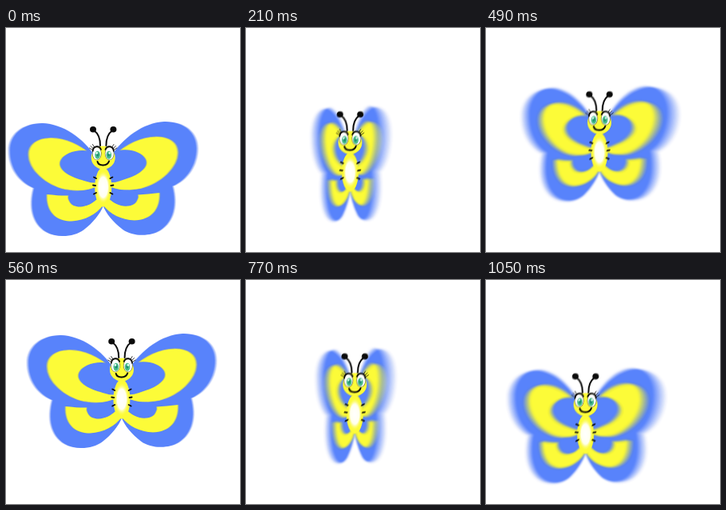
Recreate the animation shown at these times as an HTML page with a canvas. Size 293x280 px, loop 1.12 s.

```html
<!DOCTYPE html>
<html lang="en">
<head>
<meta charset="utf-8">
<title>Butterfly</title>
<style>
html, body { margin: 0; width: 100%; height: 100%; overflow: hidden; background: #fff; }
canvas { display: block; width: 293px; height: 280px; }
</style>
</head>
<body>
<canvas id="stage" width="293" height="280"></canvas>
<script>
const W = 293, H = 280, STEP = 70, STEPS = 16, TOP = 8;
const BLUE = '#5883fb', YELLOW = '#fcfb38', INK = '#0b0b0b';
const CX = 121.7;

// Left wing; the right one is its mirror image
const wing = new Path2D('M112 161C97 138 71 119 44 118C18 118 2 132 2 152C2 173 14 191 33 199C27 222 31 243 49 254C62 262 85 261 97 252C109 243 118 232 122 222L122 165Z');
const upper = new Path2D('M108 160C93 146 73 137 55 137C37 137 27 145 27 157C27 175 48 195 74 201C92 204 106 203 116 196L122 190V164Z');
const upperEye = new Path2D('M109 156C101 151 87 152 78 156C69 160 65 166 67 172C72 184 92 189 106 193L122 194V159Z');
const lower = new Path2D('M50 207C60 208 69 209 78 209C77 217 81 222 90 223C99 224 109 219 116 212L122 221C113 233 99 240 82 241C61 241 49 228 50 207Z');
const lowerEye = new Path2D('M116 199C108 200 102 203 92 203C82 203 77 206 77 212C79 222 96 225 106 219C112 215 115 211 116 207Z');

function makeCanvas() {
  const c = document.createElement('canvas');
  c.width = W;
  c.height = H;
  return c;
}

function fill(g, path, color) {
  g.fillStyle = color;
  g.fill(path);
}

function ellipse(g, x, y, rx, ry, color) {
  g.fillStyle = color;
  g.beginPath();
  g.ellipse(x, y, rx, ry, 0, 0, Math.PI * 2);
  g.fill();
}

function line(g, d, width) {
  g.strokeStyle = INK;
  g.lineWidth = width;
  g.lineCap = 'round';
  g.stroke(new Path2D(d));
}

function drawWing(g) {
  fill(g, wing, BLUE);
  g.strokeStyle = '#b5bf9c';
  g.lineWidth = 1.5;
  g.stroke(upper);
  fill(g, upper, YELLOW);
  fill(g, upperEye, BLUE);
  fill(g, lower, YELLOW);
  fill(g, lowerEye, BLUE);
}

// One side of the face, feeler and feet
function drawSide(g) {
  line(g, 'M110 128C116 132 118 138 118 147', 2);
  ellipse(g, 109, 126.8, 4, 3.8, INK);
  ellipse(g, 113.8, 157, 5.8, 8.3, '#4b4b30');
  ellipse(g, 113.8, 157, 5.3, 7.8, '#fff');
  ellipse(g, 114.6, 158.8, 3.3, 5, '#49bd8c');
  ellipse(g, 114.8, 158.5, 1.3, 2.3, '#1d8a72');
  ellipse(g, 113.7, 156.3, 1.2, 1.5, '#e6fff4');
  line(g, 'M108.6 154C109 147 117 146 119 152', 1.7);
  line(g, 'M109 153L104.5 150M109.5 151L106 147.5M111 149.5L108.5 145.5', 0.8);
  line(g, 'M113 188L110 186.5M112 197L109 196.5M113 206L110 207.5', 1.8);
}

function mirrored(g, draw) {
  draw(g);
  g.translate(2 * CX, 0);
  g.scale(-1, 1);
  draw(g);
}

function drawBody(g) {
  ellipse(g, CX, 199, 10.5, 24.5, YELLOW);
  ellipse(g, CX, 162, 15, 14.5, YELLOW);
  g.save();
  g.translate(CX, 199);
  g.scale(9.5, 21);
  const glow = g.createRadialGradient(0, 0, 0, 0, 0, 1);
  glow.addColorStop(0, '#fff');
  glow.addColorStop(0.6, '#fffff0');
  glow.addColorStop(1, 'rgba(252,251,56,0)');
  ellipse(g, 0, 0, 1, 1, glow);
  g.restore();
  g.save();
  mirrored(g, drawSide);
  g.restore();
  line(g, 'M114.5 167C116 173 127 173 129 166.5', 2);
}

function drawPose(g, pos, left, right, soft) {
  g.setTransform(1, 0, 0, 1, 0, 0);
  g.fillStyle = '#fff';
  g.fillRect(0, 0, W, H);
  g.translate(2.9 * pos, -6.25 * pos);
  for (const [spread, tilt] of [[left, -0.013], [-right, 0.013]]) {
    g.save();
    g.translate(CX, 0);
    g.transform(spread, tilt, 0, 1, 0, 0);
    g.translate(-CX, 0);
    g.filter = `blur(${soft}px)`;
    drawWing(g);
    g.restore();
  }
  drawBody(g);
}

// Average several nearby poses to smear the moving wings; the right one swings faster
function render(k) {
  const out = makeCanvas(), pose = makeCanvas();
  const g = out.getContext('2d'), p = pose.getContext('2d');
  const d = Math.min(k, TOP - k), copies = 15;
  const spread = d ? 0.98 - 0.205 * d : 0.985;
  const [swingL, swingR, drift, soft] = d ? [0.045, 0.075, 0.16, 0.9] : [0.016, 0.016, 0, 0.6];
  for (let i = 0; i < copies; i++) {
    const u = 2 * i / (copies - 1) - 1;
    drawPose(p, k + drift * u, spread - swingL * u, spread - swingR * u, soft);
    g.globalAlpha = 1 / (i + 1);
    g.drawImage(pose, 0, 0);
  }
  return out;
}

const poses = Array.from({ length: TOP + 1 }, (_, k) => render(k));
const stage = document.getElementById('stage').getContext('2d');
const start = performance.now();

function show(now) {
  const n = Math.floor(Math.max(0, now - start) / STEP) % STEPS;
  stage.drawImage(poses[Math.min(n, STEPS - n)], 0, 0);
  requestAnimationFrame(show);
}
show(start);
</script>
</body>
</html>
```
